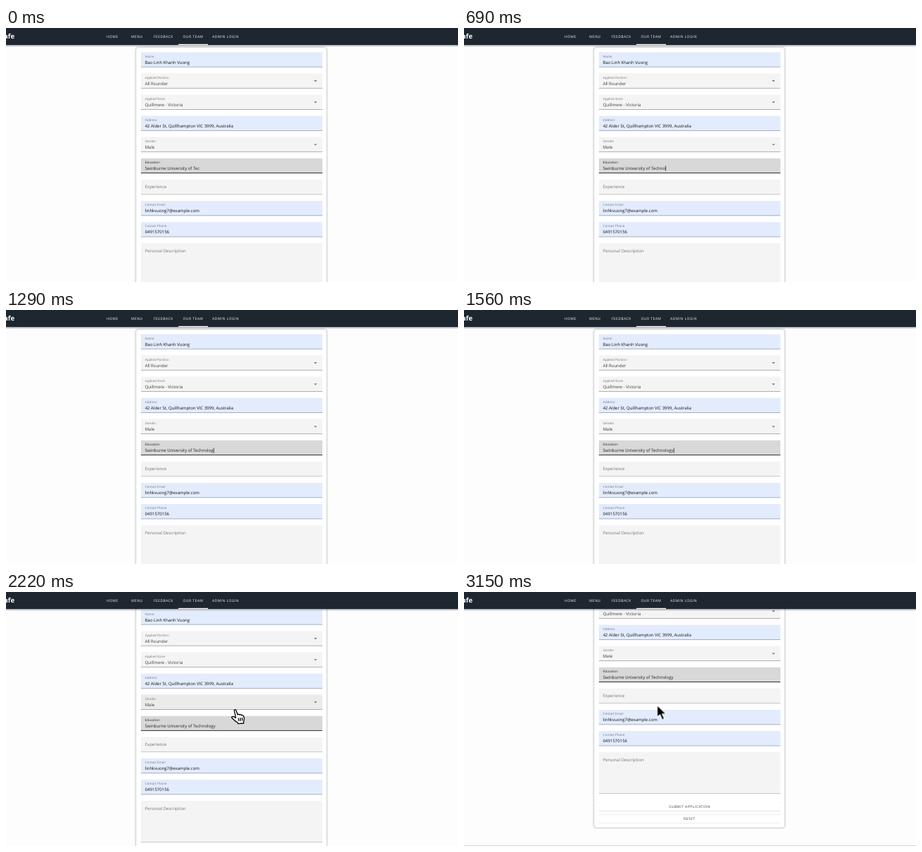
Recreate the animation shown at these times as an HTML page. Size 640 by 360 pixels, loop 3180 ms.

```html
<!DOCTYPE html>
<html lang="en">
<head>
<meta charset="utf-8">
<title>Application form</title>
<style>
  html, body { margin: 0; width: 100%; height: 100%; overflow: hidden; background: #fdfdfd; }
  svg { display: block; width: 640px; height: 360px; }
  text {
    font: 6px "Open Sans", "Noto Sans", sans-serif;
    text-rendering: geometricPrecision;
    fill: #3c3c3c;
    white-space: pre;
  }
  .label { font-size: 4.5px; fill: #777; }
  .hint { fill: #737373; }
  .filled { fill: #111; font-weight: 500; }
  .caps { font-size: 5px; font-weight: 500; letter-spacing: .45px; }
  .nav { fill: #f4f5f6; }
  .button { fill: #fff; filter: drop-shadow(0 .8px .6px rgba(0, 0, 0, .38)); }
  .card { fill: #fff; stroke: #d3d6db; stroke-width: .8; filter: drop-shadow(0 .6px 1px rgba(0, 0, 0, .28)); }

  #page { animation: scroll 3180ms infinite; }
  @keyframes scroll {
    0%, 68% { transform: translateY(0); animation-timing-function: cubic-bezier(.3, 0, .3, 1); }
    79.5%, 100% { transform: translateY(-78px); }
  }
  #hover { opacity: 0; animation: hover 3180ms infinite; }
  @keyframes hover {
    0%, 62.3% { opacity: 0; }
    64.5%, 83% { opacity: 1; }
    85.5%, 100% { opacity: 0; }
  }
  #hand { animation: hand 3180ms step-end infinite; }
  @keyframes hand {
    0% { visibility: hidden; }
    62.3% { visibility: visible; }
    86.8%, 100% { visibility: hidden; }
  }
  #arrow { animation: show 3180ms step-end infinite, move 3180ms infinite; }
  @keyframes show {
    0% { visibility: hidden; }
    86.8%, 100% { visibility: visible; }
  }
  @keyframes move {
    0%, 86.8% { transform: translate(323px, 167px); animation-timing-function: ease-in-out; }
    96.2%, 100% { transform: translate(273.5px, 160.5px); }
  }
</style>
</head>
<body>
<svg viewBox="0 0 640 360">
  <defs>
    <linearGradient id="shade" x2="0" y2="1">
      <stop stop-color="#000" stop-opacity=".36"/>
      <stop offset="1" stop-color="#000" stop-opacity="0"/>
    </linearGradient>
  </defs>

  <g id="page">
    <rect class="card" x="184" y="27.5" width="270" height="306.5" rx="3.5" style="height:384.5px"/>
    <g id="fields"></g>
    <rect class="button" x="191" y="376" width="257" height="12.6" rx="1.5"/>
    <text class="caps" x="319.7" y="384" text-anchor="middle">SUBMIT APPLICATION</text>
    <rect class="button" x="191" y="393.2" width="257" height="12.6" rx="1.5"/>
    <text class="caps" x="319.2" y="401" text-anchor="middle">RESET</text>
    <rect y="437" width="640" height=".8" fill="#ccc"/>
  </g>

  <rect y="24" width="640" height="3" fill="url(#shade)"/>
  <rect width="640" height="24" fill="#1e2630"/>
  <text x="12" y="15.2" text-anchor="end" style="font-size:9.5px;font-weight:700;fill:#fff">afe</text>
  <g id="nav"></g>
  <rect x="244" y="22.8" width="42" height="1.2" fill="#fff"/>

  <path id="hand" transform="translate(319 166)" fill="#fff" stroke="#000" stroke-width="1.3" stroke-linejoin="round"
    d="M4.2 2.2C4 .7 6.2 .2 6.8 1.8L9 8C9.4 6.7 11.3 6.8 11.8 8.3C12.4 7.2 14.3 7.5 14.8 9C15.8 8.2 17.2 8.8 17.6 10.2C18.4 13 18.8 15 17.4 17.6L17.6 20L9.4 20.6L8.8 18.8C6 17.6 3.6 15 1 12.6C-.2 11 1.8 9.8 3.2 10.6L6.4 12.4ZM10 12.6L10.8 17M12.6 12.3L13.3 16.8M15.2 12L15.7 16.4"/>
  <path id="arrow" fill="#000" stroke="#fff" stroke-width="1.1" stroke-linejoin="round"
    d="M0 0V17L4 13.3L7.2 20.6L10.2 19.3L7.1 12.2H12.4Z"/>
</svg>

<script>
  const LOOP = 3180;
  const NS = "http://www.w3.org/2000/svg";
  const fields = document.getElementById("fields");

  function add(parent, tag, attrs, content = "") {
    const el = document.createElementNS(NS, tag);
    for (const key in attrs) el.setAttribute(key, attrs[key]);
    el.textContent = content;
    return parent.appendChild(el);
  }

  const styles = {
    auto: { fill: "#e3ecfd", line: "#8f959f", text: "filled" },
    select: { fill: "#f4f4f4", line: "#929292", text: "" },
    focus: { fill: "#d8d8d8", line: "#333", text: "" },
    empty: { fill: "#f4f4f4", line: "#b4b4b4", text: "hint" }
  };

  const rows = [
    ["auto", "Name", "Bao Linh Khanh Vuong"],
    ["select", "Applied Position", "All Rounder"],
    ["select", "Applied Store", "Quillmere - Victoria"],
    ["auto", "Address", "42 Alder St, Quillhampton VIC 3999, Australia"],
    ["select", "Gender", "Male"],
    ["focus", "Education", ""],
    ["empty", "Experience"],
    ["auto", "Contact Email", "linhkvuong7@example.com"],
    ["auto", "Contact Phone", "0491570156"],
    ["empty", "Personal Description"]
  ];

  let typed;
  rows.forEach(([kind, label, value], i) => {
    const style = styles[kind];
    const y = 34.2 + i * 30.1;
    const height = i === rows.length - 1 ? 58.8 : 21.3;
    const box = { x: 191, y, width: 257, height, rx: 1 };
    add(fields, "rect", { ...box, fill: style.fill });
    if (label === "Gender") add(fields, "rect", { ...box, fill: "#ebebeb", id: "hover" });
    const line = kind === "focus" ? 1 : .7;
    add(fields, "rect", { x: 191, y: y + height - line, width: 257, height: line, fill: style.line });

    if (kind === "empty") {
      add(fields, "text", { x: 196.7, y: y + 12.6, class: "hint" }, label);
      return;
    }
    const name = add(fields, "text", { x: 196.8, y: y + 7.4, class: "label" }, label);
    const text = add(fields, "text", { x: 196.7, y: y + 16.4, class: style.text }, value);
    if (kind === "focus") {
      name.style.fill = text.style.fill = "#222";
      typed = text;
    }
    if (kind === "select") {
      add(fields, "path", { d: `M436 ${y + 9.8}h4.4l-2.2 2.2z`, fill: "#707070" });
    }
  });
  const caret = add(fields, "rect", { y: 195.4, width: .7, height: 7.2, fill: "#111" });

  const nav = document.getElementById("nav");
  [[142.3, "HOME"], [177.2, "MENU"], [209, "FEEDBACK"], [250.5, "OUR TEAM"], [292, "ADMIN LOGIN"]]
    .forEach(([x, label]) => add(nav, "text", { x, y: 13.7, class: "caps nav" }, label));

  const start = "Swinburne University of Tec";
  const rest = "hnology";
  const keyTimes = [210, 510, 660, 840, 1020, 1200, 1380];
  let shown = -1;

  function draw() {
    const t = performance.now() % LOOP;
    const count = keyTimes.filter(k => k <= t).length;
    if (count !== shown) {
      shown = count;
      typed.textContent = start + rest.slice(0, count);
      caret.setAttribute("x", 197 + typed.getComputedTextLength());
    }
    caret.setAttribute("visibility", t >= 210 && t < 1800 ? "visible" : "hidden");
    requestAnimationFrame(draw);
  }
  draw();
</script>
</body>
</html>
```
